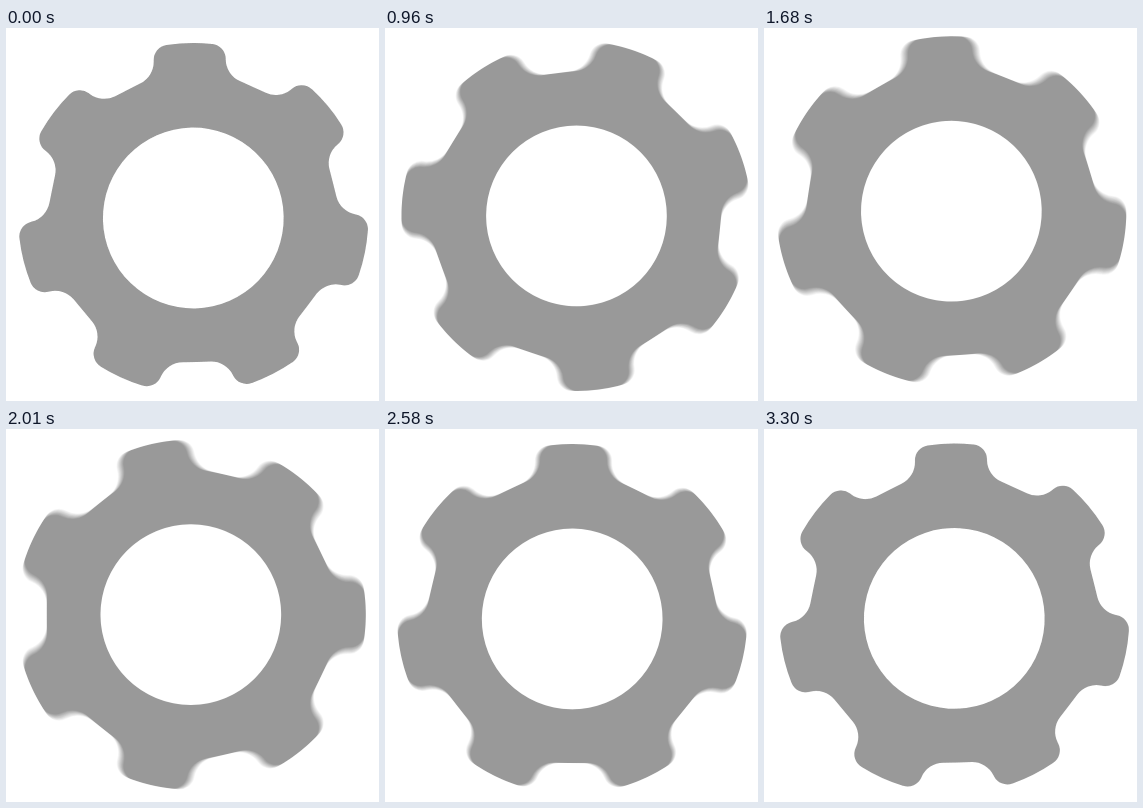
Recreate the animation shown at these times as an HTML page with a canvas. Size 373 by 373 pixels, loop 3330 ms.

```html
<!DOCTYPE html>
<html>
<head>
<meta charset="utf-8">
<title>Turning gear</title>
<style>
html, body { margin: 0; width: 100%; height: 100%; overflow: hidden; background: #fff; }
canvas { display: block; width: 373px; height: 373px; }
</style>
</head>
<body>
<canvas id="stage" width="373" height="373"></canvas>
<script>
const LOOP = 3330, STEP = 30, SHUTTER = 15, SAMPLES = 15;
const SIZE = 373, TEETH = 7, PITCH = 2 * Math.PI / TEETH;
const TURN = -8 * PITCH;            // eight tooth pitches, counterclockwise
const PIVOT = [188.2, 186.6];
const OFFSET = [-0.9, 3.4];         // gear centre relative to the pivot
const TILT = -1.3 * Math.PI / 180;
const ROOT = 144, HOLE = 90.4;

// Corners of one tooth pointing up: x, distance from centre, rounding radius
const TOOTH = [
  [-36, 142.4, 24],
  [-36, 171.8, 15],
  [0, 176.5, 175],
  [36, 171.8, 15],
  [36, 142.4, 24]
];

const ctx = document.getElementById("stage").getContext("2d");

function rotate(x, y, a) {
  const c = Math.cos(a), s = Math.sin(a);
  return [x * c - y * s, x * s + y * c];
}

function makeGear() {
  const path = new Path2D();
  path.moveTo(...rotate(0, -ROOT, -PITCH / 2));
  for (let i = 0; i < TEETH; i++) {
    TOOTH.forEach(([x, y, r], k) => {
      const next = TOOTH[k + 1];
      const a = i * PITCH;
      const to = next ? rotate(next[0], -next[1], a) : rotate(0, -ROOT, a + PITCH / 2);
      path.arcTo(...rotate(x, -y, a), ...to, r);
    });
    path.lineTo(...rotate(0, -ROOT, (i + 0.5) * PITCH));
  }
  path.closePath();
  path.moveTo(HOLE, 0);
  path.arc(0, 0, HOLE, 0, 2 * Math.PI);
  return path;
}

const gear = makeGear();

function angleAt(t) {
  const p = Math.min(1, Math.max(0, t / LOOP));
  return TURN * p * p * (3 - 2 * p);
}

function draw(t) {
  ctx.setTransform(1, 0, 0, 1, 0, 0);
  ctx.globalCompositeOperation = "source-over";
  ctx.clearRect(0, 0, SIZE, SIZE);

  // Motion blur: add up coverage over the open shutter, then tint it
  ctx.globalCompositeOperation = "lighter";
  ctx.globalAlpha = 1 / SAMPLES;
  ctx.fillStyle = "#000";
  for (let i = 0; i < SAMPLES; i++) {
    const shift = (i / (SAMPLES - 1) - 0.5) * SHUTTER;
    ctx.setTransform(1, 0, 0, 1, ...PIVOT);
    ctx.rotate(angleAt(t + shift));
    ctx.translate(...OFFSET);
    ctx.rotate(TILT);
    ctx.fill(gear, "evenodd");
  }

  ctx.setTransform(1, 0, 0, 1, 0, 0);
  ctx.globalAlpha = 1;
  ctx.globalCompositeOperation = "source-in";
  ctx.fillStyle = "#999";
  ctx.fillRect(0, 0, SIZE, SIZE);
}

function tick() {
  const t = performance.now() % LOOP;
  draw(Math.floor(t / STEP) * STEP);
  requestAnimationFrame(tick);
}
tick();
</script>
</body>
</html>
```
